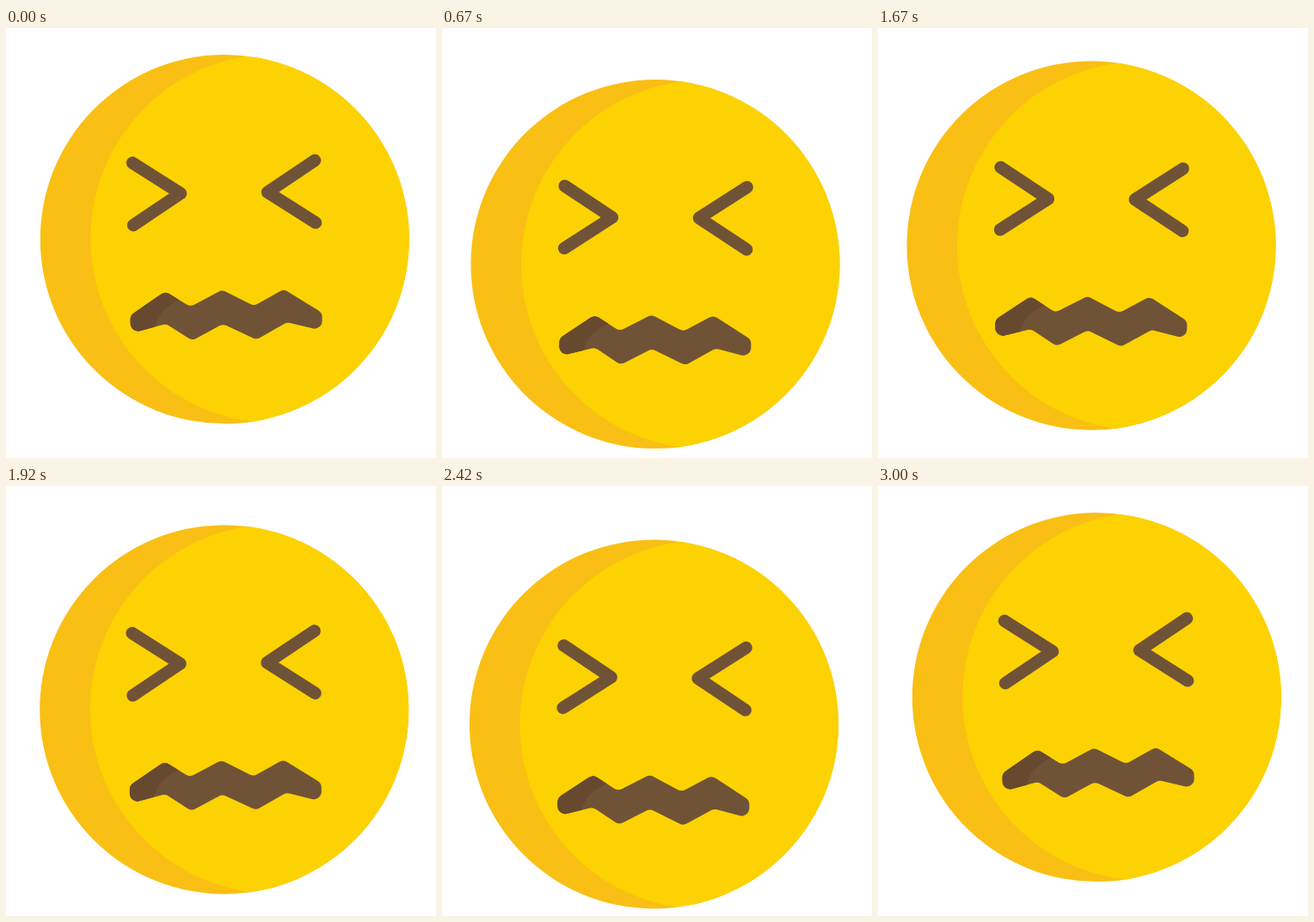
Recreate the animation shown at these times as an HTML page with a canvas. Size 500x500 px, loop 3.08 s.

```html
<!DOCTYPE html>
<html lang="en">
<head>
<meta charset="utf-8">
<title>Shivering face</title>
<style>
html, body { margin: 0; width: 100%; height: 100%; overflow: hidden; background: #fff; }
canvas { display: block; }
</style>
</head>
<body>
<canvas id="stage" width="500" height="500"></canvas>
<script>
const ctx = document.getElementById('stage').getContext('2d');
const LOOP = 3080, FPS = 12, CYCLE = 36, RADIUS = 214.5;
const LIT = '#fcd202', SHADE = '#f9bf14', BROWN = '#705337', DARK_BROWN = '#674930';

// Height of the face centre over one cycle: [step, y]
const BOB = [[0, 245.6], [2, 240], [5, 259], [8, 274.6], [14, 259.7], [20, 253],
  [26, 269.7], [29, 277], [32, 264.7], [35, 248.6]];

// Mouth corners relative to the face centre
const MOUTH = [[-111, 87], [-70, 59.5], [-41, 78], [-4, 58.8], [33, 78], [68, 59], [112, 87],
  [112, 108], [71, 97.5], [35.5, 117.3], [-3.5, 98.5], [-39.5, 117.3], [-69.5, 97.5], [-111, 108]];

function bobPoint(i) {
  const count = BOB.length, wraps = Math.floor(i / count);
  const [step, y] = BOB[i - wraps * count];
  return [step + wraps * CYCLE, y];
}

// Smooth periodic curve through the BOB points
function bob(step) {
  step %= CYCLE;
  let i = 0;
  while (bobPoint(i + 1)[0] <= step) i++;
  const [a, b, c, d] = [-1, 0, 1, 2].map(k => bobPoint(i + k));
  const span = c[0] - b[0], s = (step - b[0]) / span;
  const slopeB = (c[1] - a[1]) / (c[0] - a[0]) * span;
  const slopeC = (d[1] - b[1]) / (d[0] - b[0]) * span;
  const blend = s * s * (3 - 2 * s);
  return b[1] * (1 - blend) + c[1] * blend
    + slopeB * s * (1 - s) ** 2 - slopeC * s * s * (1 - s);
}

function disc(x, color) {
  ctx.beginPath();
  ctx.arc(x, 0, RADIUS, 0, 2 * Math.PI);
  ctx.fillStyle = color;
  ctx.fill();
}

function roundedPolygon(points, radius) {
  const last = points[points.length - 1];
  ctx.beginPath();
  ctx.moveTo((last[0] + points[0][0]) / 2, (last[1] + points[0][1]) / 2);
  points.forEach((p, i) => ctx.arcTo(...p, ...points[(i + 1) % points.length], radius));
  ctx.closePath();
}

function drawEye(side) {
  ctx.beginPath();
  ctx.moveTo(side * 106, -90.2);
  ctx.lineTo(side * 50.5, -54);
  ctx.lineTo(side * 106, -17.8);
  ctx.stroke();
}

function drawMouth() {
  ctx.save();
  roundedPolygon(MOUTH, 9);
  ctx.fillStyle = BROWN;
  ctx.fill();
  ctx.clip();
  ctx.beginPath();
  ctx.moveTo(-50, 68);
  ctx.quadraticCurveTo(-80, 80, -83, 104);
  ctx.lineTo(-120, 120);
  ctx.lineTo(-120, 50);
  ctx.lineTo(-50, 50);
  ctx.fillStyle = DARK_BROWN;
  ctx.fill();
  ctx.restore();
}

function draw(step) {
  const sway = 4.2 * Math.cos(2 * Math.PI * step / FPS);
  ctx.clearRect(0, 0, 500, 500);
  ctx.save();
  ctx.translate(250.1 + sway, bob(step));
  ctx.rotate(-0.19 * sway * Math.PI / 180);

  ctx.save();
  disc(0, SHADE);
  ctx.clip();
  disc(58.5, LIT);
  ctx.restore();

  ctx.strokeStyle = BROWN;
  ctx.lineWidth = 14.5;
  ctx.lineCap = ctx.lineJoin = 'round';
  drawEye(-1);
  drawEye(1);
  drawMouth();
  ctx.restore();
}

function tick() {
  const time = performance.now() % LOOP;
  draw(Math.floor((time + 4) * FPS / 1000));
  requestAnimationFrame(tick);
}
tick();
</script>
</body>
</html>
```
